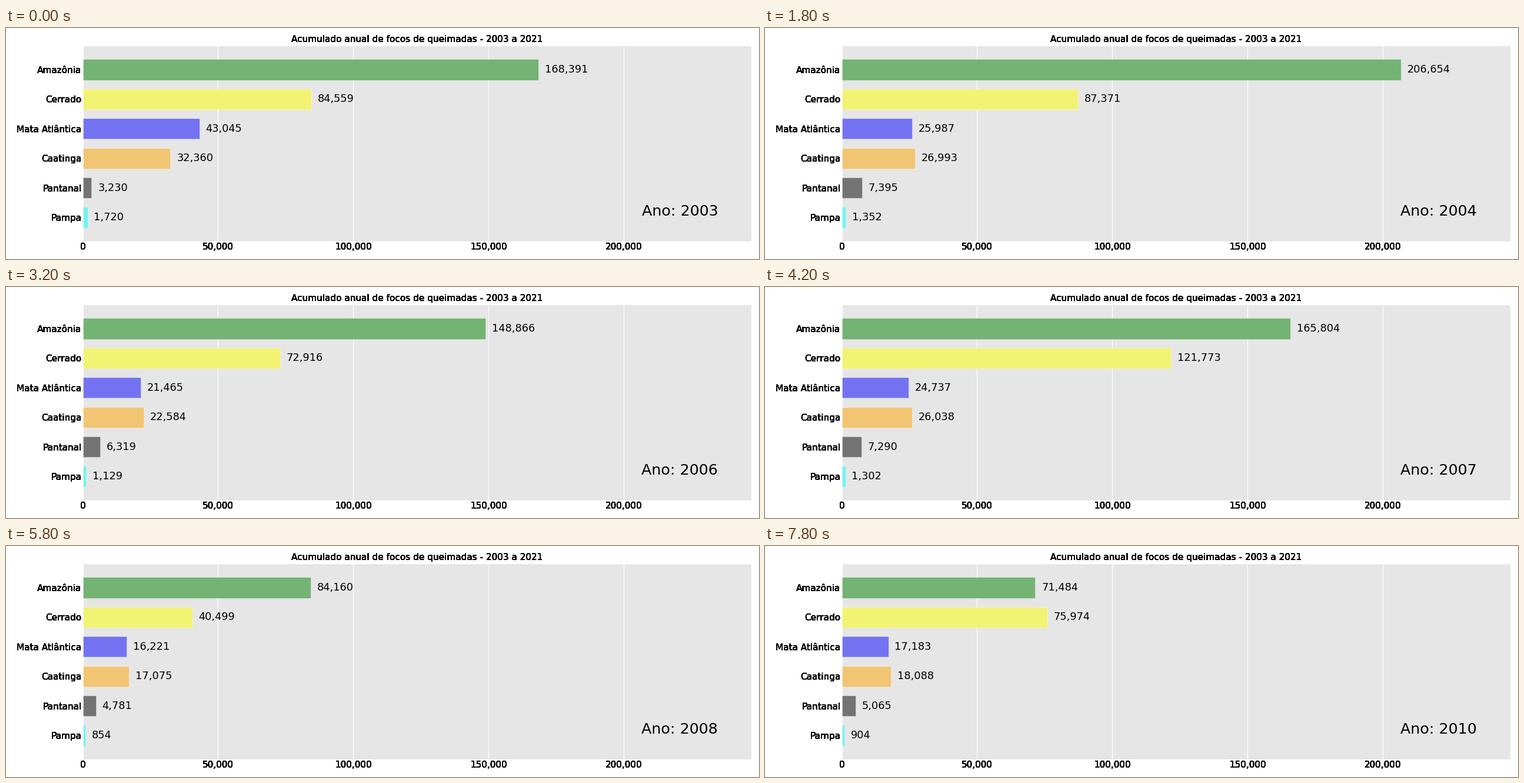
Write a matplotlib script that moves like this. It is 1280x394 px and loops after 8000 ms.

```python
import numpy as np
import matplotlib.pyplot as plt
from matplotlib.animation import FuncAnimation
from matplotlib.colors import to_rgb

W, H, DPI = 1280, 394, 100
PX = 72 / DPI                      # points per pixel
UNIT = W / 7 / 72                  # pixels per nominal font point
LEFT, RIGHT, TOP, BOTTOM = 130.6, 1267.2, 30.6, 363.5
STEPS, FRAMES, INTERVAL = 5, 40, 200
FIRST_YEAR = 2003

plt.rcParams["font.family"] = "DejaVu Sans"

# The two leading biomes have one key point per year
amazonia = np.array([168391, 212100, 205292, 140732, 181400,
                     103420, 79345, 130814, 56652])
cerrado = np.array([84559, 90000, 86714, 56895, 137000,
                    60865, 35407, 133386, 61621])
years = np.arange(len(amazonia))
trend = 10000 + 0.06 * amazonia + 0.05 * cerrado


def follow(start, share):
    """Begin at start, then settle quickly on a share of the trend."""
    series = share * trend
    return series + (start - series[0]) * 0.1 ** years


# From the bottom bar to the top one
BIOMES = [
    ("Pampa", "cyan", follow(1720, 0.05)),
    ("Pantanal", "black", follow(3230, 0.28)),
    ("Caatinga", "orange", follow(32360, 1)),
    ("Mata Atlântica", "blue", follow(43045, 0.95)),
    ("Cerrado", "yellow", cerrado),
    ("Amazônia", "green", amazonia),
]
names, colors, totals = zip(*BIOMES)
rows = np.arange(1, len(names) + 1)
x_max = np.max(totals) * 1.05 * 1.11
y_min, y_max = 0.2, len(names) + 0.8

fig = plt.figure(figsize=(W / DPI, H / DPI), dpi=DPI, facecolor="white")
ax = fig.add_axes([LEFT / W, 1 - BOTTOM / H,
                   (RIGHT - LEFT) / W, (BOTTOM - TOP) / H], facecolor="0.9")
ax.set(xlim=(0, x_max), ylim=(y_min, y_max), yticks=[],
       xticks=np.arange(0, 200001, 50000))
ax.set_axisbelow(True)
ax.tick_params(length=0, labelbottom=False)
ax.grid(True, axis="x", color="white", lw=1.2 * PX)
ax.spines[:].set_visible(False)


def font(points):
    return points * UNIT * PX


def tint(color):
    """Half the colour, half the panel grey."""
    return 0.5 * np.array(to_rgb(color)) + 0.45


def heavy_text(x, y, text, ha, va="baseline", layers=10):
    """Stack copies so that the soft glyph edges fill up to solid black."""
    for _ in range(layers):
        fig.text(x / W, 1 - y / H, text, ha=ha, va=va, fontsize=font(6))


def to_px(x, y):
    return (LEFT + x / x_max * (RIGHT - LEFT),
            BOTTOM - (y - y_min) / (y_max - y_min) * (BOTTOM - TOP))


heavy_text((LEFT + RIGHT) / 2, 24,
           "Acumulado anual de focos de queimadas - 2003 a 2021", "center")
for row, name in zip(rows, names):
    heavy_text(128.3, to_px(0, row)[1], name, "right", "center_baseline")
for tick in ax.get_xticks():
    heavy_text(to_px(tick, 0)[0], 377.6, f"{tick:,.0f}", "center")

bars = ax.barh(rows, np.zeros(len(rows)), height=0.7,
               color=[tint(c) for c in colors],
               ec=(1, 1, 1, 0.5), lw=0.7 * PX)
labels = [ax.text(0, row, "", fontsize=font(7), va="center") for row in rows]
year = ax.text(0.95, 0.152, "", transform=ax.transAxes, fontsize=font(10),
               ha="right", va="center")


def update(frame):
    for bar, label, series in zip(bars, labels, totals):
        value = np.interp(frame / STEPS, years, series)
        bar.set_width(value)
        label.set_x(value + 0.0095 * x_max)
        label.set_text(f"{value:,.0f}")
    year.set_text(f"Ano: {FIRST_YEAR + frame // STEPS}")
    return [*bars, *labels, year]


anim = FuncAnimation(fig, update, frames=FRAMES, interval=INTERVAL,
                     repeat=True, repeat_delay=0, blit=False)
plt.show()
```
